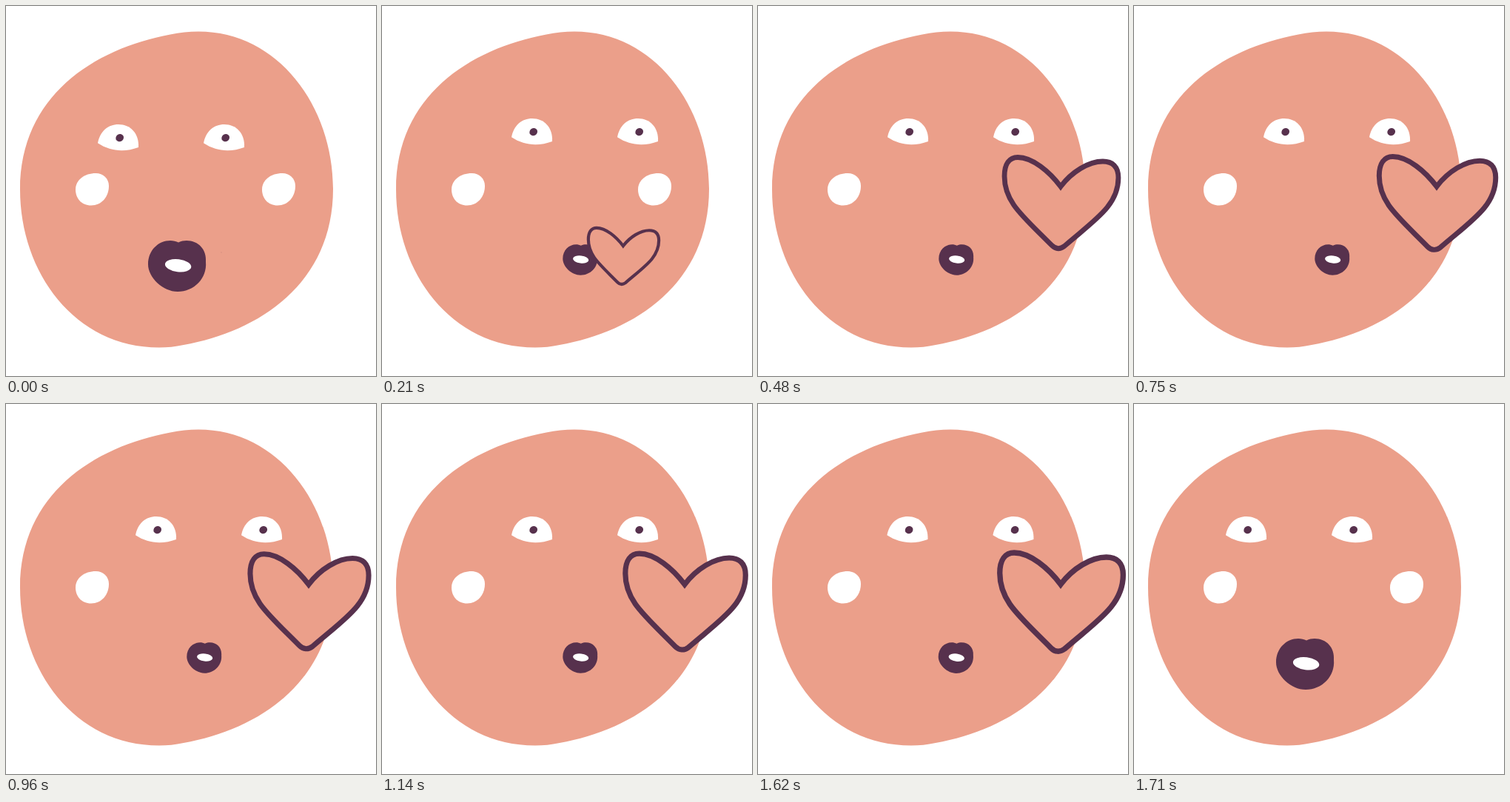
Animation, 500 px wide and 500 px high, one loop 1.8 s. Source, as an HTML page:

```html
<!DOCTYPE html>
<html lang="en">
<head>
<meta charset="utf-8">
<title>Blown kiss</title>
<style>
  /* Typed properties keep the shapes crisp at every scale. */
  @property --x { syntax: "<length>"; inherits: false; initial-value: 0px; }
  @property --y { syntax: "<length>"; inherits: false; initial-value: 0px; }
  @property --s { syntax: "<number>"; inherits: false; initial-value: 1; }

  :root { --skin: #eb9f8a; --plum: #57314d; }
  html, body { margin: 0; width: 100%; height: 100%; overflow: hidden; background: #fff; }
  svg { display: block; width: 100%; height: 100%; }

  .skin { fill: var(--skin); }
  .plum { fill: var(--plum); }
  .white { fill: #fff; }
  .outline { fill: var(--skin); stroke: var(--plum); stroke-width: 6.8; stroke-miterlimit: 10; }

  .eyes, .mouth, .heart {
    transform-box: view-box;
    transform-origin: 0 0;
    transform: translate(var(--x), var(--y)) scale(var(--s));
    animation: 1800ms linear infinite;
  }
  .eyes { animation-name: eyes; }
  .mouth { animation-name: mouth; }
  .heart { animation-name: drift, rise, grow; }

  /* The glance keeps its height until the loop restarts. */
  @keyframes eyes {
    0% { --x: 0px; --y: 0px; animation-timing-function: ease-in-out; }
    11.2%, 90% { --x: 51px; --y: -8px; }
    94.8%, 100% { --x: 0px; --y: -8px; }
  }
  @keyframes mouth {
    0% { --x: 231.5px; --y: 351.5px; --s: 1; animation-timing-function: ease-in-out; }
    11.2%, 90% { --x: 268px; --y: 343px; --s: .6; }
    94.8%, 100% { --x: 231.5px; --y: 351.5px; --s: 1; }
  }

  /* The heart leaves the lips sideways, then curves upwards. */
  @keyframes drift {
    0% { --x: 291px; animation-timing-function: cubic-bezier(.4, 0, .7, .5); }
    11.667% { --x: 325.5px; animation-timing-function: cubic-bezier(.3, .25, .6, 1); }
    22.222%, 100% { --x: 409px; }
  }
  @keyframes rise {
    0% { --y: 333px; animation-timing-function: cubic-bezier(.5, 0, .8, .4); }
    11.667% { --y: 326.3px; animation-timing-function: cubic-bezier(.3, .12, .6, 1); }
    22.222%, 100% { --y: 247px; }
  }
  @keyframes grow {
    0% { --s: .008; }
    11.667% { --s: .616; animation-timing-function: cubic-bezier(.3, .4, .6, 1); }
    22.222% { --s: .993; }
    90% { --s: 1.095; }
    94.8%, 100% { --s: 0; }
  }
</style>
</head>
<body>
<svg viewBox="0 0 500 500">
  <defs>
    <g id="eye">
      <path class="white" d="M124 185.3C127 169 138 160 152 160C168 160 180 172 179 191C160 198 141 196.5 124 185.3Z"/>
      <ellipse class="plum" cx="153.7" cy="178.2" rx="5.5" ry="5" transform="rotate(-35 153.7 178.2)"/>
    </g>
    <path id="cheek" class="white" d="M121.5 226C131 226 139 233 139 243C139 258 129 269.5 115 269.5C102 269.5 94 260 94 248C94 235 106 226 121.5 226Z"/>
  </defs>

  <path class="skin" d="M260 34.5C368 34.5 442 136 442 247C442 375 342 440 240 458C229 460.5 218 461.5 207 461.5C93 461.5 19 360 19 248C19 122 118 58 222 38.5C235 36 247 34.5 260 34.5Z"/>

  <use href="#cheek"/>
  <use href="#cheek" x="252"/>

  <g class="eyes">
    <use href="#eye"/>
    <use href="#eye" x="143"/>
  </g>

  <g class="mouth">
    <g transform="translate(-231.5 -351.5)">
      <path class="plum" d="M233 319.5C237 317.7 240 317 244 317C260 317 271.5 329 270 346C272 368 254 386 232 386C212 386 192 367 192 349C192 330 206 317 222 317C226 317 230 318 233 319.5Z"/>
      <ellipse class="white" cx="232.6" cy="350.7" rx="17.8" ry="8.5" transform="rotate(7 232.6 350.7)"/>
    </g>
  </g>

  <g class="heart">
    <path class="outline" transform="translate(-409 -247)" d="M409 244C394 224 371 204.5 351 204.5C340 204.5 333 213 333 230C333 265 357 283 397 323.5C402 328.5 408 329 414 324.5C455 289 487 270 487 232C487 217 479 210 466 210C447 210 424 224 409 244Z"/>
  </g>
</svg>
</body>
</html>
```
